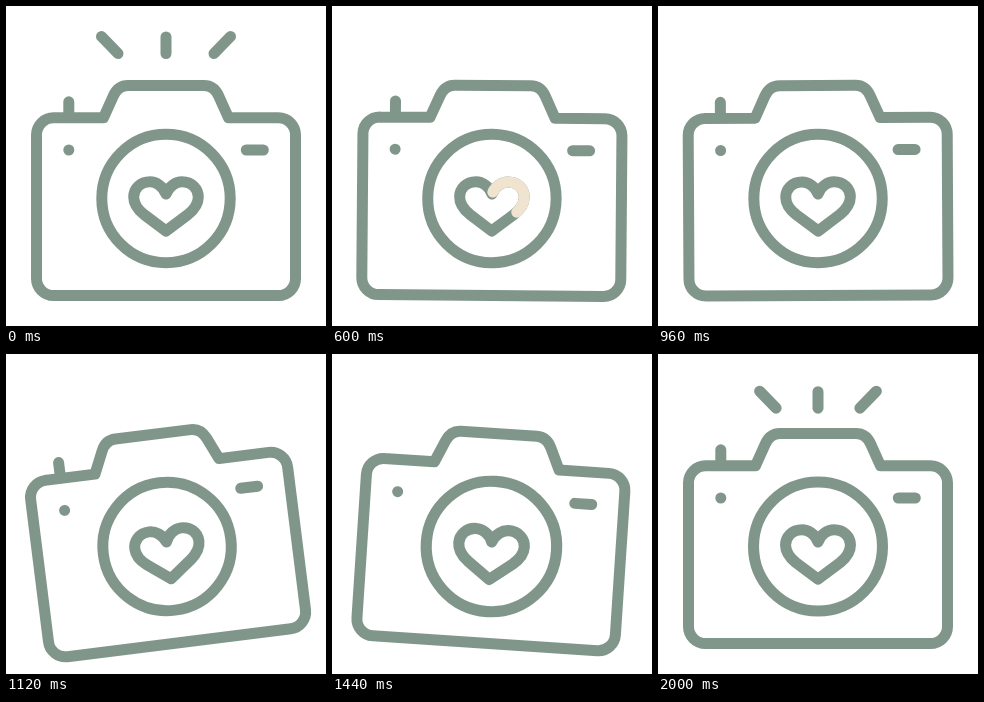
Animation of 320x320 px, one loop 2040 ms. Source, as an HTML page:

```html
<!DOCTYPE html>
<html lang="en">
<head>
<meta charset="utf-8">
<title>Camera</title>
<style>
  html, body { margin: 0; width: 100%; height: 100%; overflow: hidden; background: #fff; }
  svg { display: block; width: 100%; height: 100%; }
  .line { fill: none; stroke: #80968b; stroke-width: 11; stroke-linecap: round; stroke-linejoin: round; }
  .body { fill: #fff; }
  .accent { stroke: #f0e4d0; }
</style>
</head>
<body>
<svg viewBox="0 0 320 320">
  <g class="line" id="rays">
    <path data-dir="-1" d="M95.5 30.5L112 47.5"/>
    <path data-dir="0" d="M160 31V47.5"/>
    <path data-dir="1" d="M224.5 30.5L208 47.5"/>
  </g>
  <g class="line" id="camera">
    <path id="button" d="M62.8 95.8V111"/>
    <path class="body" d="M47 111.8H97.5L107.3 90Q112 79.5 122 79.5H198Q208 79.5 212.7 90L222.5 111.8H272.5a17 17 0 0 1 17 17V272.5a17 17 0 0 1-17 17H47.5a17 17 0 0 1-17-17V128.8a17 17 0 0 1 17-17Z"/>
    <path d="M62.8 144h.01M240.3 144H257.3"/>
    <g id="lens">
      <circle cx="160" cy="192.5" r="64.2"/>
      <path class="heart"/>
      <path class="heart accent" id="trace" pathLength="1"/>
    </g>
  </g>
</svg>
<script>
  const LOOP = 2040, STEP = 40, RAYS_START = 1720, RAYS_END = 280;
  const HEART = "M160 188C157 180 150 175.8 144 175.8C134 175.8 127.7 183 127.7 191" +
    "C127.7 199 133 204.5 138 208.5L160 225L182 208.5C187 204.5 192.3 199 192.3 191" +
    "C192.3 183 186 175.8 176 175.8C170 175.8 163 180 160 188";
  const byId = id => document.getElementById(id);
  const rays = byId("rays"), camera = byId("camera"), button = byId("button");
  const lens = byId("lens"), trace = byId("trace");
  document.querySelectorAll(".heart").forEach(p => p.setAttribute("d", HEART));

  const ease = (t, from, to) => {
    const u = Math.min(1, Math.max(0, (t - from) / (to - from)));
    return u * u * (3 - 2 * u);
  };

  // Eased value through a list of [time, value] keys
  const track = (t, keys) => keys.slice(1).reduce(
    (v, [time, value], i) => v + (value - keys[i][1]) * ease(t, keys[i][0], time), keys[0][1]);

  const rayTravel = n => 5.3 * n + 0.09 * n * n;

  // Rays rise from behind the camera and leave through the top, across the loop point
  function drawRays(t) {
    const flying = t < RAYS_END || t > RAYS_START;
    rays.style.display = flying ? "" : "none";
    const steps = (t + LOOP - RAYS_START) % LOOP / STEP;
    const rise = rayTravel(steps) - rayTravel((LOOP - RAYS_START) / STEP);
    for (const ray of rays.children)
      ray.setAttribute("transform", `translate(${ray.dataset.dir * rise * 0.92} ${-rise})`);
  }

  function drawTrace(t) {
    const start = ease(t, 220, 840), end = ease(t, 0, 640);
    trace.style.display = end > start ? "" : "none";
    trace.setAttribute("stroke-dasharray", `${end - start} 2`);
    trace.setAttribute("stroke-dashoffset", -start);
  }

  function draw(t) {
    drawRays(t);
    drawTrace(t);
    const angle = track(t, [[560, 0], [790, 5.7], [1150, -7.4], [1520, 5.3], [1770, 0]]);
    const press = track(t, [[1150, 0], [1420, 18], [1460, 18], [1800, 0]]);
    const scale = track(t, [[1360, 1], [1700, 1.115], [2040, 1]]);
    camera.setAttribute("transform", `rotate(${angle} 160 184)`);
    button.setAttribute("transform", `translate(0 ${press})`);
    lens.setAttribute("transform", `translate(160 192.5) scale(${scale}) translate(-160 -192.5)`);
  }

  const origin = performance.now();
  function tick() {
    const t = (performance.now() - origin) % LOOP;
    draw(Math.floor(t / STEP) * STEP);
    requestAnimationFrame(tick);
  }
  tick();
</script>
</body>
</html>
```
